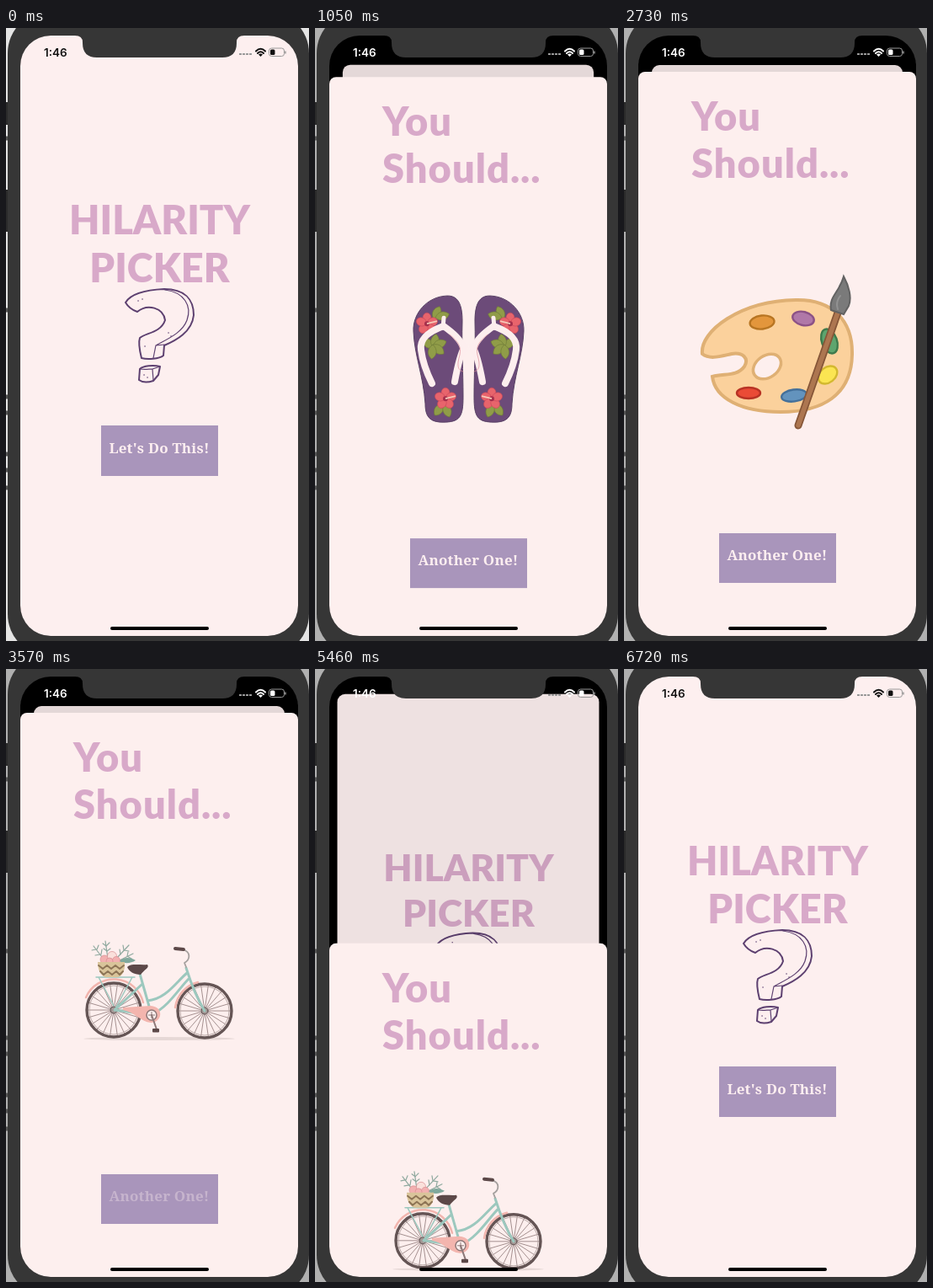
These frames come from a looping animation (360x728 px, 6790 ms). An HTML page:

```html
<!DOCTYPE html>
<html lang="en">
<head>
<meta charset="utf-8">
<title>Hilarity Picker</title>
<style>
html, body { margin: 0; width: 100%; height: 100%; overflow: hidden; }
svg { display: block; width: 360px; height: 728px; }
.title { font: 900 47px Lato, "Open Sans", sans-serif; fill: #d8a9c9; }
.label { font: 700 17px "Noto Serif", serif; letter-spacing: .2px; fill: #fdeef0; text-anchor: middle; }
.clock { font: 600 13.5px Inter, sans-serif; }
.line { fill: none; stroke-linecap: round; stroke-linejoin: round; }
</style>
</head>
<body>
<svg viewBox="0 0 360 728">
<defs>
  <clipPath id="screen"><rect x="17" y="9" width="330" height="713" rx="36"/></clipPath>
  <g id="flower">
    <g fill="#e8646c" stroke="#c8475a" stroke-width=".6">
      <ellipse cy="-7" rx="5" ry="6"/>
      <ellipse cy="-7" rx="5" ry="6" transform="rotate(72)"/>
      <ellipse cy="-7" rx="5" ry="6" transform="rotate(144)"/>
      <ellipse cy="-7" rx="5" ry="6" transform="rotate(216)"/>
      <ellipse cy="-7" rx="5" ry="6" transform="rotate(288)"/>
    </g>
    <circle r="3" fill="#a5304c"/>
    <path d="M0 0L12 -3" stroke="#f6c9b8" stroke-width="1.6"/>
  </g>
  <path id="leaf" d="M0 0C-7 -5 -6 -13 0 -17C6 -13 7 -5 0 0Z" fill="#909c48" stroke="#6d7a38" stroke-width=".6"/>
  <g id="flop">
    <path d="M156 312C170 311 175 322 175 342C174 376 176 400 176 432C176 456 172 462 152 462C136 462 131 455 131 440C129 408 118 382 117 354C116 332 134 313 156 312Z" fill="#6c4b79" stroke="#584064"/>
    <use href="#leaf" transform="translate(141 340) rotate(25)"/>
    <use href="#leaf" transform="translate(143 338) rotate(75)"/>
    <use href="#flower" transform="translate(133 345)"/>
    <use href="#leaf" transform="translate(141 374) rotate(-50)"/>
    <use href="#leaf" transform="translate(141 374) rotate(10)"/>
    <use href="#leaf" transform="translate(140 372) rotate(70)"/>
    <use href="#leaf" transform="translate(140 370) rotate(130)"/>
    <use href="#leaf" transform="translate(140 370) rotate(185)"/>
    <use href="#leaf" transform="translate(152 440) rotate(215)"/>
    <use href="#leaf" transform="translate(154 440) rotate(160)"/>
    <use href="#flower" transform="translate(155 434)"/>
    <g class="line" stroke="#fdeeee">
      <path d="M153 338L152 350" stroke-width="5"/>
      <path d="M152 348C136 354 124 362 126 376C128 392 133 404 139 416" stroke-width="8"/>
      <path d="M153 348C164 356 174 364 177 376" stroke-width="8"/>
      <path d="M178 372C173 380 170 392 166 414" stroke-width="8"/>
    </g>
    <path d="M160 358C170 366 174 372 172 382C168 396 170 400 176 402" class="line" stroke="#dd8f98" stroke-width=".7"/>
  </g>
  <g id="wheel" class="line">
    <path id="spokes" stroke="#8d7878" stroke-width=".8"/>
    <circle r="32" stroke="#655555" stroke-width="3.4"/>
    <circle r="29" stroke="#b9a9a7" stroke-width="1"/>
    <circle r="4" fill="#a39795" stroke="#655555"/>
  </g>
</defs>

<rect id="desk" width="360" height="728"/>
<path d="M0 131h2M0 335h2M0 438h2M0 457h2M0 506h2M0 525h2M0 546h2" stroke="#555" stroke-width="5"/>
<path d="M0 88h4v27h-4zM0 192h4v50h-4z" fill="#2b2b2b"/>
<rect x="2" y="-20" width="358" height="766" rx="50" fill="#363636"/>

<g clip-path="url(#screen)">
  <rect x="16" y="8" width="332" height="716"/>
  <g id="home">
    <rect x="17" y="9" width="330" height="714" rx="10" fill="#fdefef"/>
    <g class="title" text-anchor="middle">
      <text x="182.5" y="245">HILARITY</text>
      <text x="182.5" y="302">PICKER</text>
    </g>
    <g class="line" stroke="#5d4070" stroke-width="2">
      <path d="M142 326C148 316 166 311 188 310C212 310 223 322 223 341C221 361 202 371 188 377L187 389C182 393 168 394 161 392C159 384 157 374 159 368C166 362 184 362 189 347C187 332 168 327 156 337C150 335 145 331 142 326Z"/>
      <path d="M189 311C212 314 221 330 215 347C209 363 190 370 178 377L175 392M178 377L188 376" stroke-width="1.2"/>
      <path d="M159 405C163 401 175 400 183 402L181 412L175 419C169 421 162 421 158 418Z"/>
      <path d="M159 405C165 406 170 405 174 405L175 418M174 405L183 402" stroke-width="1.2"/>
      <path d="M157 324h.1M162 322h.1M193 362h.1M196 366h.1M165 378h.1M164 412h.1M168 415h.1" stroke-width="1.5"/>
    </g>
    <rect x="113" y="472" width="139" height="60" fill="#a995bb"/>
    <text id="start" class="label" x="182" y="505">Let's Do This!</text>
    <rect id="dim" x="17" y="9" width="330" height="714" rx="10"/>
  </g>

  <g id="sheet">
    <rect x="17" y="52" width="330" height="690" rx="8" fill="#fdefee"/>
    <g class="title" letter-spacing="1">
      <text x="80" y="122">You</text>
      <text x="80" y="178">Should...</text>
    </g>

    <g class="pic">
      <use href="#flop"/>
      <use href="#flop" transform="matrix(-1 0 0 1 365 0)"/>
    </g>

    <g class="pic">
      <path d="M93 387C90 360 138 324 204 323C248 322 272 348 271 388C270 436 236 456 186 456C140 456 108 440 105 414C120 410 134 414 143 402C149 392 141 385 128 387C114 390 102 394 93 387Z" fill="#fbd19c" stroke="#dfb074" stroke-width="4"/>
      <ellipse cx="170" cy="402" rx="18" ry="13" transform="rotate(-35 170 402)" fill="#fdefee" stroke="#dfb074" stroke-width="3.5"/>
      <g stroke-width="2.4">
        <ellipse cx="164" cy="349.500" rx="14.500" ry="8" transform="rotate(-6 164 349)" fill="#e3963c" stroke="#b87522"/>
        <ellipse cx="213" cy="345" rx="13" ry="8" transform="rotate(14 213 345)" fill="#b078a8" stroke="#8c5286"/>
        <ellipse cx="244" cy="372" rx="9" ry="15" transform="rotate(-20 244 372)" fill="#5ea56e" stroke="#3d7a4c"/>
        <ellipse cx="242" cy="412" rx="12.500" ry="9" transform="rotate(-38 242 412)" fill="#fbe552" stroke="#d3b92f"/>
        <ellipse cx="202" cy="436.500" rx="15" ry="7" transform="rotate(-8 202 436)" fill="#6393bd" stroke="#44709a"/>
        <ellipse cx="148" cy="433.500" rx="14" ry="6.500" fill="#ea4b36" stroke="#b83325"/>
      </g>
      <g class="line">
        <path d="M207 472L254 338" stroke="#865638" stroke-width="9"/>
        <path d="M207 472L254 338" stroke="#ad7650" stroke-width="5.500"/>
      </g>
      <path d="M261 295C267 306 271 320 267 330L261 340L246 335C243 319 256 314 261 295Z" fill="#7a7a7a" stroke="#626262" stroke-width="2"/>
      <path d="M257 318C253 323 252 328 254 334" class="line" stroke="#929292" stroke-width="2"/>
    </g>

    <g class="pic">
      <ellipse cx="182" cy="439" rx="90" ry="2" fill="#e6d8d6"/>
      <use href="#wheel" x="128" y="405"/>
      <use href="#wheel" x="236" y="406"/>
      <g class="line" stroke="#f2b5ae" stroke-width="2.500">
        <path d="M95 390A36 36 0 0 1 163 396M201 402A36 36 0 0 1 228 372"/>
      </g>
      <g class="line" stroke="#9cc8be" stroke-width="3">
        <path d="M159 362L173 411L129 405L162 374M214 355C220 374 226 390 236 406M215 361C202 372 190 392 168 394M217 368C205 380 194 400 174 410"/>
        <path d="M107 366H153M110 366L128 400M150 366L129 405" stroke-width="1.500"/>
      </g>
      <path d="M214 354L212 349C219 345 220 336 210 333" class="line" stroke="#a5a09e" stroke-width="1.800"/>
      <path d="M201 332L211 333" class="line" stroke="#5c4848" stroke-width="4"/>
      <path d="M139 402L172 400C188 401 186 420 172 420C160 419 152 407 139 405Z" fill="#f3b5ae"/>
      <circle cx="173" cy="411" r="6" fill="#fdefee" stroke="#8d7878" stroke-width="1.500"/>
      <path d="M169 411h8M173 407v8" stroke="#8d7878"/>
      <path d="M173 411L179 428" class="line" stroke="#8d7878" stroke-width="2"/>
      <rect x="174" y="427" width="8" height="4.500" rx="1" fill="#5c4848"/>
      <path d="M144 354C148 349 160 352 168 351C171 355 164 357 160 363C152 363 146 359 144 354Z" fill="#5c4848"/>
      <g class="line" stroke="#8fa99f" stroke-width="1.200">
        <path d="M117 346L104 329M121 344L118 323M131 344L146 328M135 346L151 338"/>
        <path d="M107 333l-5 1M108 333l2-5M112 339l-6 1M113 339l1-6M119 329l-4-3M119 329l4-4M120 335l-4-3M120 335l4-3M140 334l-1-6M140 334l6 1M136 339l-1-6M144 341l1-5M144 341l5 3"/>
      </g>
      <path d="M134 347C142 341 148 343 154 346C148 350 141 350 134 347Z" fill="#80a89c"/>
      <g fill="#f2b0b0" stroke="#d98f93" stroke-width=".7">
        <circle cx="117" cy="345" r="5"/><circle cx="126" cy="341" r="5.500" fill="#fae0db"/><circle cx="131" cy="346" r="4.500"/><circle cx="123" cy="347" r="4"/>
      </g>
      <path d="M109 348H141C142 358 138 365 133 366H118C112 364 109 357 109 348Z" fill="#d9c49a"/>
      <path d="M110 352l5 4 5-4 5 4 5-4 5 4 5-4M112 359l4 4 5-4 5 4 5-4 4 4 4-4" class="line" stroke="#8d7455" stroke-width="2"/>
    </g>

    <rect x="113" y="600" width="139" height="59" fill="#a995bb"/>
    <text id="again" class="label" x="182" y="632">Another One!</text>
  </g>
  <rect x="124" y="711" width="117" height="4" rx="2"/>
</g>

<path d="M82 8H283V9Q274 9 274 17V18Q274 35 257 35H108Q91 35 91 18V17Q91 9 82 9Z" fill="#363636"/>
<g id="status" fill="currentColor">
  <text class="clock" x="45" y="33.500">1:46</text>
  <path d="M277 31h3m1 0h3m1 0h3m1 0h3" stroke="#999" stroke-width="2"/>
  <g class="line" stroke="currentColor" stroke-width="2" stroke-linecap="butt">
    <path d="M297 27.500Q302.500 22 308 27.500M299 30Q302.500 26.500 306 30"/>
  </g>
  <path d="M300 31.500Q302.500 29.500 305 31.500L302.500 34Z"/>
  <rect x="312.500" y="24" width="18" height="9.500" rx="3" fill="none" stroke="#999"/>
  <rect x="314" y="25.500" width="5.500" height="6.500" rx="1.500"/>
  <path d="M332 27.500v3" stroke="#999" stroke-width="1.500"/>
</g>
</svg>
<script>
const LOOP = 6790, STEP = 70, TOP = 52, TRAVEL = 676;
const $ = id => document.getElementById(id);
const pics = document.querySelectorAll('.pic');

$('spokes').setAttribute('d', Array.from({ length: 22 }, (_, i) => {
  const a = i * Math.PI / 11;
  return `M0 0L${31 * Math.cos(a)} ${31 * Math.sin(a)}`;
}).join(''));

// Linear interpolation through [time, value] pairs.
function track(t, keys) {
  const i = keys.findIndex(k => k[0] > t);
  if (i === 0) return keys[0][1];
  if (i < 0) return keys[keys.length - 1][1];
  const [t0, a] = keys[i - 1], [t1, b] = keys[i];
  return a + (b - a) * (t - t0) / (t1 - t0);
}

// How far the sheet is open: a damped spring up, an eased swipe down.
function openness(t) {
  if (t < 800) return 0;
  if (t < 5220) {
    const x = (t - 800) * .027;
    return 1 - (1 + x) * Math.exp(-x);
  }
  const u = Math.min(1, (t - 5220) / 550);
  return 1 - u * u * (3 - 2 * u);
}

function draw(t) {
  const p = openness(t), s = 1 - .097 * p, top = 9 + 35 * p;
  $('home').setAttribute('transform', `translate(${182 * (1 - s)} ${top - 9 * s}) scale(${s})`);
  $('dim').setAttribute('opacity', .1 * p);
  $('sheet').setAttribute('transform', `translate(0 ${TRAVEL * (1 - p)})`);
  $('status').style.color = p > .45 ? '#fff' : '#111';

  const pic = t < 2240 ? 0 : t < 3430 ? 1 : 2;
  pics.forEach((g, i) => g.style.display = i === pic ? '' : 'none');

  $('start').style.opacity = track(t, [[420, 1], [630, .25], [840, .25], [1300, 1]]);
  $('again').style.opacity = track(t, [[1960, 1], [2170, .25], [2240, .25], [2730, 1],
    [3150, 1], [3360, .25], [3430, .25], [3570, .35], [4970, .65]]);

  const grey = Math.round(track(t, [[0, 228], [280, 176]]));
  $('desk').setAttribute('fill', `rgb(${grey},${grey},${grey})`);
}

function tick() {
  const t = performance.now() % LOOP;
  draw(Math.floor(t / STEP) * STEP);
  requestAnimationFrame(tick);
}
tick();
</script>
</body>
</html>
```
